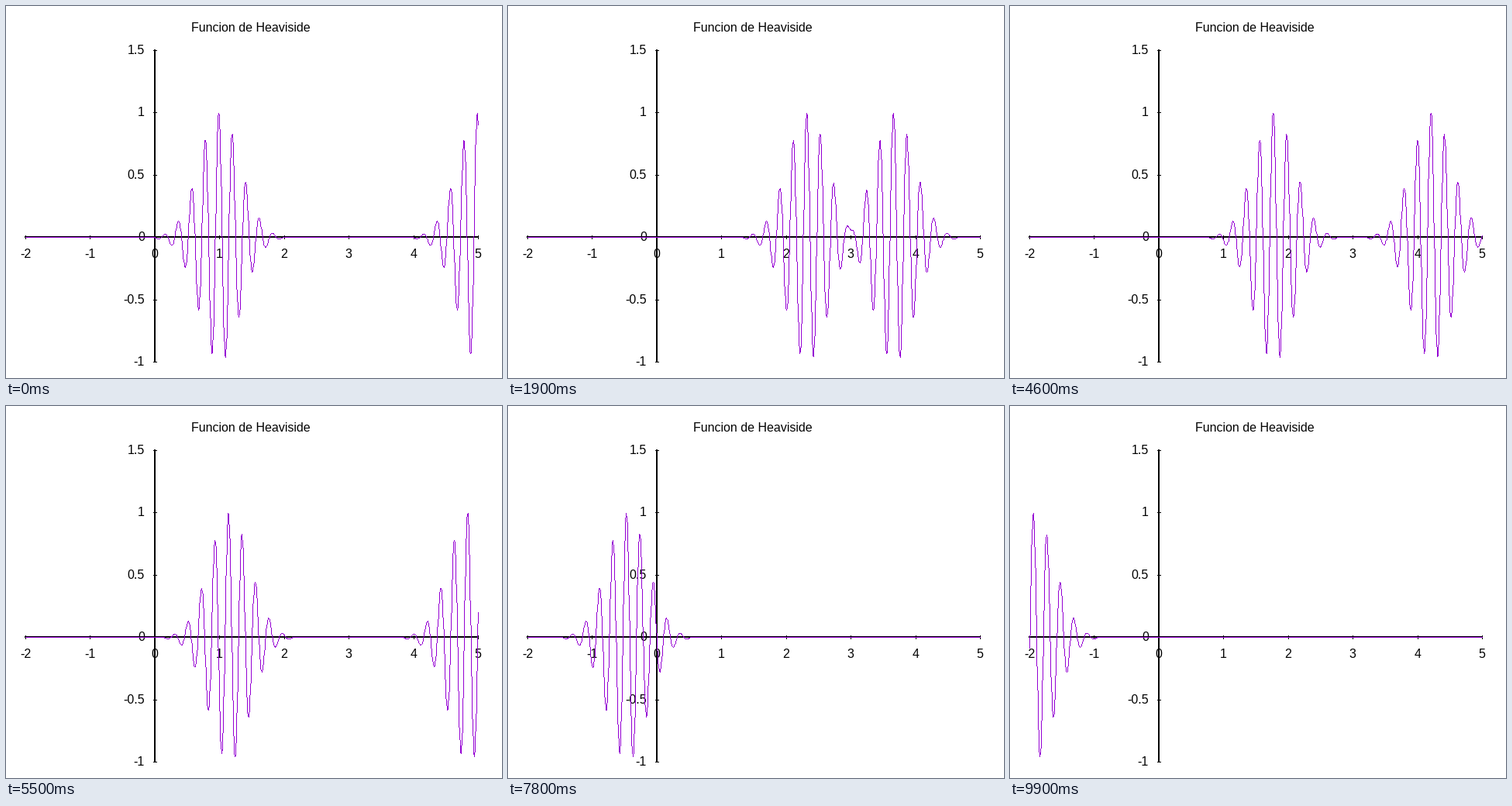
Animation of 640x480 px, one loop 10 s. Source, as a matplotlib script:

```python
import numpy as np
import matplotlib.pyplot as plt
from matplotlib.animation import FuncAnimation
from matplotlib.colors import to_rgb

W, H, DPI = 640, 480, 100
FRAMES, STEP = 100, 0.07
LEFT, RIGHT, TOP, BOTTOM = 25, 609, 57, 459
PURPLE = "#9400d3"

plt.rcParams.update({
    "font.family": "Liberation Sans",
    "font.size": 16 * 72 / DPI,
    "text.hinting": "default",
    "text.hinting_factor": 8,
})


def px(x):
    return LEFT + (x + 2) / 7 * (RIGHT - LEFT)


def py(y):
    return BOTTOM - (y + 1) / 2.5 * (BOTTOM - TOP)


def pulse(u):
    """Modulated Gaussian, cut off by two unit steps at u = -1 and u = 1."""
    window = np.heaviside(u + 1, 1) - np.heaviside(u - 1, 0)
    return window * np.exp(-5 * u**2) * np.cos(30 * u + 0.44)


def trace(cols, rows):
    """Pixels of a one-pixel polyline through whole-number points."""
    dx, dy = np.diff(cols), np.diff(rows)
    n = np.maximum(np.maximum(abs(dx), abs(dy)), 1).astype(int)
    seg = np.repeat(np.arange(len(n)), n)
    t = (np.arange(len(seg)) - np.repeat(np.cumsum(n) - n, n)) / n[seg]
    c = np.append(cols[seg] + t * dx[seg], cols[-1])
    r = np.append(rows[seg] + t * dy[seg], rows[-1])
    return np.round(c).astype(int), np.round(r).astype(int)


fig = plt.figure(figsize=(W / DPI, H / DPI), dpi=DPI, facecolor="white")
ax = fig.add_axes([0, 0, 1, 1])


def layer(z):
    """A transparent pixel layer over the whole stage."""
    rgba = np.zeros((H, W, 4))
    art = ax.imshow(rgba, extent=(0, W, H, 0), aspect="auto",
                    interpolation="nearest", zorder=z)
    return rgba, art


axes_px, axes_art = layer(1)
curve_px, curve_art = layer(3)
curve_px[..., :3] = to_rgb(PURPLE)
ax.set_xlim(0, W)
ax.set_ylim(H, 0)
ax.axis("off")


def bar(x, y, w, h):
    axes_px[y:y + h, x:x + w, 3] = 1


X0, Y0 = round(px(0)), round(py(0))
bar(LEFT - 1, Y0 - 1, RIGHT - LEFT + 2, 2)
bar(X0 - 1, TOP - 1, 2, BOTTOM - TOP + 2)

for v in range(-2, 6):
    x = round(px(v))
    bar(x, Y0 - 2, 1, 5)
    ax.text(x, 325, f"{v}", ha="center", va="baseline", zorder=2)

for v in np.arange(-1, 2, 0.5):
    y = round(py(v))
    bar(X0 - 2, y, 5, 1)
    ax.text(179, y + 5, f"{v:g}", ha="right", va="baseline", zorder=2)

axes_art.set_data(axes_px)
ax.text(315.5, 33, "Funcion de Heaviside", ha="center", va="baseline", zorder=2)

xs = np.linspace(-2, 5, 1000)
cols = np.round(px(xs))


def update(i):
    shift = STEP * i
    ys = pulse(xs - 1 - shift) + pulse(xs - 5 + shift)
    c, r = trace(cols, np.round(py(ys)))
    inside = (r >= TOP) & (r <= BOTTOM)
    curve_px[..., 3] = 0
    curve_px[r[inside], c[inside], 3] = 1
    curve_art.set_data(curve_px)
    return curve_art,


anim = FuncAnimation(fig, update, frames=FRAMES, interval=100,
                     repeat=True, repeat_delay=0, blit=False)
plt.show()
```
